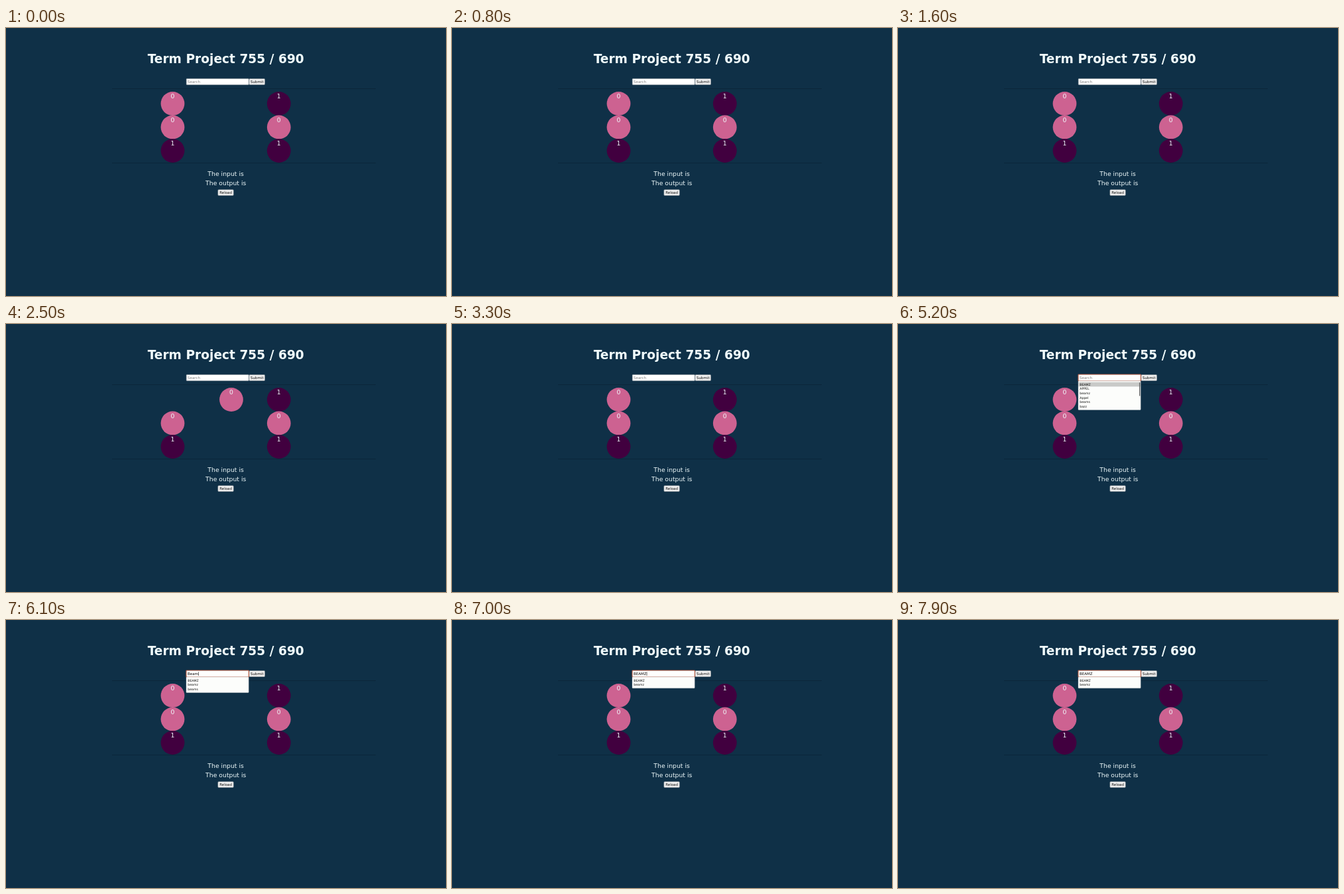
Write an HTML page with a canvas that moves like this. It is 664x404 px and loops after 8 s.

```html
<!DOCTYPE html>
<html lang="en">
<head>
<meta charset="utf-8">
<title>Term Project</title>
<style>
  html, body { margin: 0; width: 100%; height: 100%; overflow: hidden; background: #0f3047; }
  canvas { display: block; width: 664px; height: 404px; }
</style>
</head>
<body>
<canvas id="stage"></canvas>
<script>
const W = 664, H = 404, LOOP = 8000, STEP = 100;
const FONT = '"DejaVu Sans", Verdana, sans-serif';
const BG = '#0f3047', LIGHT = '#f0fbfc', PINK = '#cd6291', PLUM = '#41003f';
const WORDS = ['BEAMZ', 'APPEL', 'beamz', 'Appel', 'beams', 'bazz'];
const ROW = 6.67;

// Text in the search field, by the time each value appears
const TYPED = [[0, ''], [5500, 'B'], [5600, 'Be'], [5800, 'Bea'], [5900, 'Beam'], [7000, 'BEAMZ']];
const FOCUS = 3700, OPEN = 3800;

const canvas = document.getElementById('stage');
const ctx = canvas.getContext('2d');
const dpr = window.devicePixelRatio || 1;
canvas.width = W * dpr;
canvas.height = H * dpr;

function text(str, x, y, size, color, align = 'center', weight = 'normal') {
  ctx.font = `${weight} ${size}px ${FONT}`;
  ctx.textAlign = align;
  ctx.fillStyle = color;
  ctx.fillText(str, x, y);
}

function box(x, y, w, h, r, fill, stroke, line = 0.7) {
  ctx.beginPath();
  ctx.roundRect(x, y, w, h, r);
  ctx.fillStyle = fill;
  ctx.fill();
  if (stroke) {
    ctx.strokeStyle = stroke;
    ctx.lineWidth = line;
    ctx.stroke();
  }
}

function ball(bit, x, row) {
  const y = 114 + row * 35.5;
  ctx.beginPath();
  ctx.arc(x, y, 17.9, 0, Math.PI * 2);
  ctx.fillStyle = bit ? PLUM : PINK;
  ctx.fill();
  text(bit, x, y - 7.6, 9.3, LIGHT);
}

function button(label, x, y, w, h) {
  box(x, y, w, h, 1.2, '#f0f0f0', '#8c9297', 0.6);
  text(label, x + w / 2, y + h / 2 + 2.1, 5.5, '#111');
}

function ease(t, from, to) {
  const p = Math.min(1, Math.max(0, (t - from) / (to - from)));
  return p * p * (3 - 2 * p);
}

function dragX(t) {
  return 251.5 + 88.5 * (ease(t, 1900, 2450) - ease(t, 2800, 3300));
}

function current(t) {
  return TYPED.filter(([at]) => at <= t).pop();
}

function hovered(t) {
  return (t >= 4700 && t < 5500) || (t >= 6600 && t < 7000) ? 0 : -1;
}

function field(t) {
  const [since, value] = current(t);
  if (t >= FOCUS) box(272, 76, 94.4, 10, 0.8, '#fffefd', '#b65b43', 1.1);
  else box(272.3, 76.4, 94, 9.2, 0.8, '#fff', '#a9adb0', 0.6);
  text(value || 'Search', 274, 83, 5.5, value ? '#111' : '#858585', 'left');
  if (value && (t - since) % 1000 < 500) {
    const x = 274.2 + ctx.measureText(value).width;
    ctx.fillStyle = '#111';
    ctx.fillRect(x, 78.3, 0.6, 5.6);
  }
}

function list(t) {
  if (t < OPEN) return;
  const query = current(t)[1].toLowerCase();
  const items = WORDS.filter(w => w.toLowerCase().includes(query));
  const hover = hovered(t);
  box(272, 86, 94.2, items.length * ROW + 3.5, 0.8, '#fcfdfb', '#c3c8ca', 0.4);
  items.forEach((word, i) => {
    const y = 87.7 + i * ROW;
    if (i === hover) {
      ctx.fillStyle = '#c9cac8';
      ctx.fillRect(272.3, y, 93.6, ROW);
    }
    text(word, 274.3, y + 5.05, 4.65, '#111', 'left');
  });
  if (items.length === WORDS.length) box(364, 88, 1.3, 20.5, 0.6, '#5c5f61');
}

function draw(t) {
  ctx.setTransform(dpr, 0, 0, dpr, 0, 0);
  ctx.fillStyle = BG;
  ctx.fillRect(0, 0, W, H);

  text('Term Project 755 / 690', 331.7, 53, 18.6, LIGHT, 'center', 'bold');

  ctx.fillStyle = '#0a2438';
  for (const y of [91, 203]) ctx.fillRect(160, y, 398, 0.8);

  [1, 0, 1].forEach((bit, row) => ball(bit, 411.8, row));
  [0, 0, 1].forEach((bit, row) => ball(bit, row ? 251.5 : dragX(t), row));

  text('The input is', 331.6, 222.5, 9.3, LIGHT);
  text('The output is', 331.7, 236.6, 9.3, LIGHT);
  button('Submit', 367, 76.5, 23.6, 9);
  button('Reload', 319.9, 243.7, 23.4, 8.7);
  field(t);
  list(t);
}

function frame() {
  const t = performance.now() % LOOP;
  draw(Math.floor(t / STEP) * STEP);
  requestAnimationFrame(frame);
}
frame();
</script>
</body>
</html>
```
